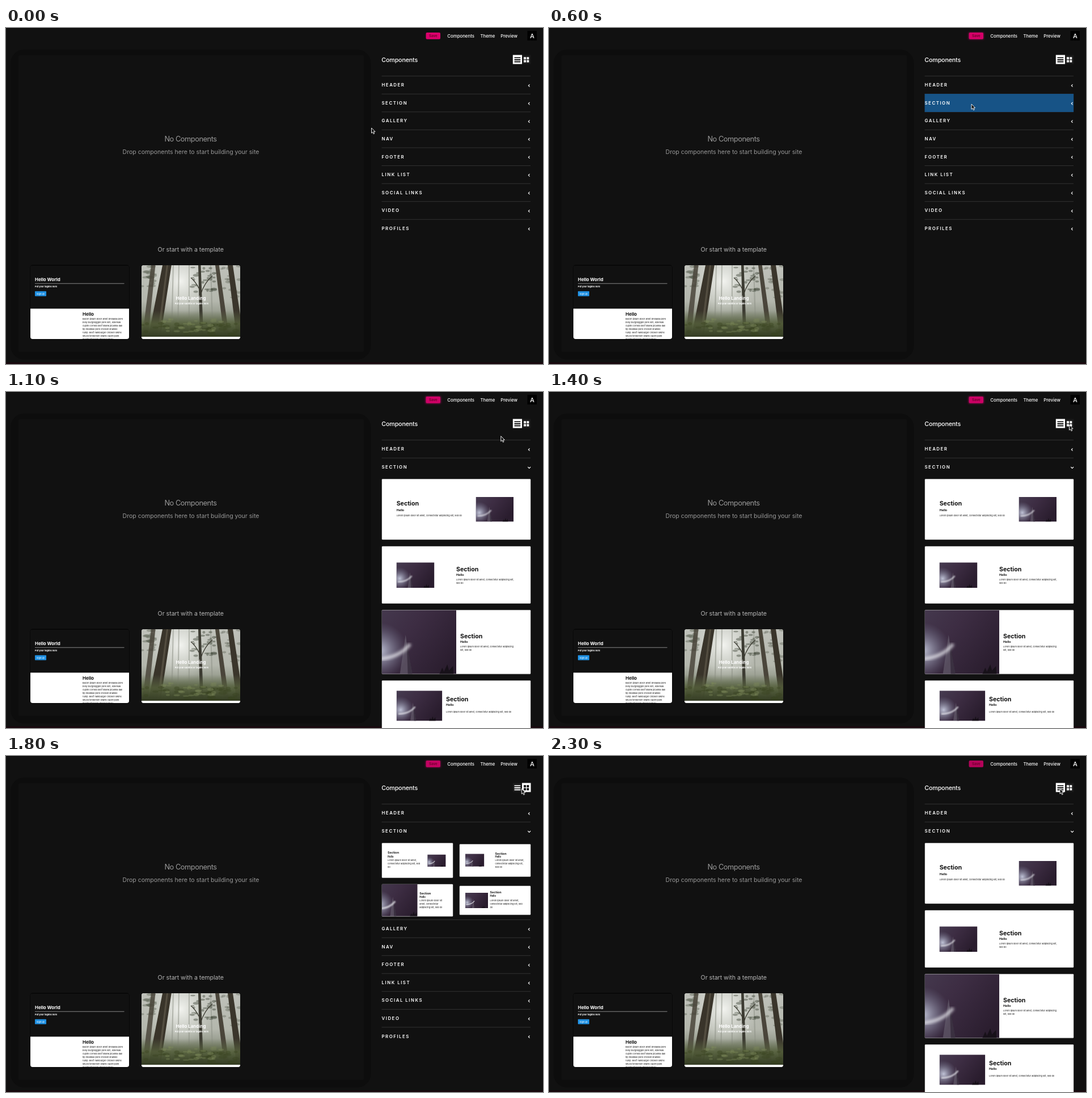
These frames come from a looping animation (947x592 px, 2400 ms). An HTML page:

```html
<!DOCTYPE html>
<html lang="en">
<head>
<meta charset="utf-8">
<title>Site builder</title>
<style>
  html, body { margin: 0; width: 100%; height: 100%; overflow: hidden; background: #111; }
  svg { display: block; width: 947px; height: 592px; }
  text { font-family: Inter, "Open Sans", sans-serif; fill: #fff; white-space: pre; }
  .mid { text-anchor: middle; }
  .nav { font-size: 7.8px; font-weight: 500; }
  .cat { font-size: 7.8px; font-weight: 600; letter-spacing: 1.55px; }
  .bold { font-weight: 700; }
  .tiny { font-size: 3.9px; }
  .ink text, text.ink { fill: #111; }
  .rule { stroke: #323232; }
  .chevron { fill: none; stroke: #fff; stroke-width: 1.1; }
  .card { fill: #fff; stroke: #d8d8d8; stroke-width: .5; }
  .hidden { display: none; }
  .tab rect { fill: #1b1b1b; }
  .tab path { fill: #fff; }
  .tab.on rect { fill: #fff; }
  .tab.on path { fill: #111; }
</style>
</head>
<body>
<svg viewBox="0 0 947 592">
  <defs>
    <linearGradient id="dusk" x2="1" y2=".5">
      <stop offset="0" stop-color="#463b50"/>
      <stop offset=".45" stop-color="#3d2d43"/>
      <stop offset="1" stop-color="#2a1d2e"/>
    </linearGradient>
    <radialGradient id="glow">
      <stop offset="0" stop-color="#ced3e6" stop-opacity=".9"/>
      <stop offset="1" stop-color="#7d809a" stop-opacity="0"/>
    </radialGradient>
    <linearGradient id="mist" x2="0" y2="1">
      <stop offset="0" stop-color="#bfc1ba"/>
      <stop offset=".5" stop-color="#b4b7ad"/>
      <stop offset=".75" stop-color="#8a9080"/>
      <stop offset="1" stop-color="#4a5238"/>
    </linearGradient>
    <radialGradient id="light">
      <stop offset="0" stop-color="#f2f3ef"/>
      <stop offset="1" stop-color="#d9dcd5" stop-opacity="0"/>
    </radialGradient>
    <linearGradient id="ground" x2="0" y2="1">
      <stop offset="0" stop-color="#5d6748" stop-opacity="0"/>
      <stop offset=".5" stop-color="#545f3a" stop-opacity=".85"/>
      <stop offset="1" stop-color="#343c24"/>
    </linearGradient>
    <filter id="soft"><feGaussianBlur stdDeviation="2.6"/></filter>
    <filter id="halo" x="-40%" y="-60%" width="180%" height="220%"><feGaussianBlur stdDeviation="1.8"/></filter>
    <clipPath id="dark-tile"><rect x="43" y="418" width="174" height="130" rx="4"/></clipPath>
    <clipPath id="photo-tile"><rect x="239" y="418" width="174" height="130" rx="4"/></clipPath>
    <symbol id="night" viewBox="0 0 172 113" preserveAspectRatio="xMidYMid slice">
      <rect width="172" height="113" fill="url(#dusk)"/>
      <ellipse cx="16" cy="72" rx="50" ry="50" fill="url(#glow)"/>
      <path d="M62 44 52 113H74Z" fill="#6c6473" opacity=".6"/>
      <path d="M64 52 66 113H74Z" fill="#302635" opacity=".7"/>
      <path d="M8 87Q50 86 70 60" fill="none" stroke="#f0f0f5" stroke-width="6" opacity=".75" filter="url(#soft)"/>
      <path d="M122 113l5-11 3 7 6-13 3 11 7-8 1 14z" fill="#171119"/>
    </symbol>
  </defs>

  <rect width="947" height="592" fill="#111"/>
  <path d="M0 .5H947M946.5 0V592" stroke="#080808"/>
  <path d="M0 590.5H947" stroke="#1c050d" stroke-width="2"/>
  <rect x="8" y="38" width="635.5" height="546" rx="24" fill="#0d0d0d"/>
  <rect x="22" y="48" width="609" height="522.5" rx="2" fill="#111"/>

  <rect id="halo-box" x="739" y="7" width="28.5" height="14" rx="3" fill="#90104f" filter="url(#halo)"/>
  <rect id="save" x="740.5" y="8" width="25.5" height="11.8" rx="2" fill="#dc006c"/>
  <text class="mid bold" x="753.3" y="16.2" font-size="6.2" style="fill:#70002f">Save</text>
  <text class="nav" x="778.3" y="16.8">Components</text>
  <text class="nav" x="836.5" y="16.8">Theme</text>
  <text class="nav" x="872.2" y="16.8">Preview</text>
  <rect x="919.5" y="5" width="16.5" height="17"/>
  <text class="mid" x="927.8" y="17.5" font-size="11" font-weight="500">A</text>

  <g class="mid">
    <text x="325.5" y="199.5" font-size="12.8" letter-spacing="-.45" style="fill:#9a9a9a">No Components</text>
    <text x="326" y="222.4" font-size="10.55" style="fill:#989898">Drop components here to start building your site</text>
    <text x="325.8" y="394.2" font-size="10.55" style="fill:#b8b8b8">Or start with a template</text>
  </g>

  <rect x="42.5" y="417.5" width="175" height="131" rx="4.5"/>
  <g clip-path="url(#dark-tile)">
    <rect x="43" y="418.5" width="174" height="77" fill="#111"/>
    <rect x="43" y="494.5" width="174" height="54" fill="#fff"/>
    <text class="bold" x="51" y="446" font-size="7.9">Hello World</text>
    <path d="M51 450.2H208.500" stroke="#a5a5a5" stroke-width=".8"/>
    <text class="bold tiny" x="51" y="456.6">Put your tagline here</text>
    <rect x="51" y="463.8" width="20" height="8.7" rx=".8" fill="#1f90e2"/>
    <text class="mid" x="61" y="469.5" font-size="3.7" font-weight="500">Sign Up</text>
    <text class="bold ink" x="135" y="507.3" font-size="8">Hello</text>
    <g id="story" class="ink"></g>
  </g>

  <g clip-path="url(#photo-tile)">
    <rect x="239" y="418" width="174" height="130" fill="#fff"/>
    <g id="forest"></g>
    <rect x="239" y="544" width="174" height="4" fill="#fff"/>
    <text class="mid bold" x="326" y="478.5" font-size="7.95">Hello Landing</text>
    <text class="mid tiny bold" x="327.5" y="486.6">Put your subtitle or tagline here</text>
  </g>

  <text x="662.3" y="59.6" font-size="10.7" font-weight="500" letter-spacing="-.15">Components</text>
  <g id="list-tab" class="tab">
    <rect x="893.8" y="47.5" width="16.2" height="16"/>
    <path d="M896.5 51.4h10.800v1.900h-10.800zm0 3.600h10.800v1.900h-10.800zm0 3.600h10.800v1.900h-10.800z"/>
  </g>
  <g id="grid-tab" class="tab">
    <rect x="910" y="47.5" width="15.5" height="16"/>
    <path d="M913 51.300h4v3.900h-4zm5.300 0h4v3.900h-4zM913 56.500h4v3.900h-4zm5.300 0h4v3.900h-4z"/>
  </g>

  <g id="top-rows"></g>
  <g id="rest-rows"></g>
  <g id="press">
    <rect x="662.5" y="116" width="262.7" height="32" fill="#175386"/>
    <text class="cat" x="662.5" y="134.9">SECTION</text>
  </g>
  <path id="closed-mark" class="chevron" d="M923.5 130.900l-2.200 2.200 2.200 2.200"/>
  <path id="open-mark" class="chevron" d="M920.3 132l2.400 2.400 2.400-2.400"/>
  <g id="list-cards" class="ink"></g>
  <g id="grid-cards" class="ink"></g>

  <circle id="ring" cx="901" cy="58" r="14.3" fill="#888" fill-opacity=".16" stroke="#c4c4c4" stroke-width="1.1"/>
  <path id="cursor" d="M0 0V9.200L2.100 7.300 3.600 10.700 5.200 10 3.800 6.700H6.600Z" fill="#111" stroke="#fff" stroke-width=".9" stroke-linejoin="round"/>
</svg>

<script>
const $ = id => document.getElementById(id);
const label = (x, y, text, cls, size) =>
  `<text x="${x}" y="${y}" class="${cls}"${size ? ` font-size="${size}"` : ''}>${text}</text>`;
const lines = (x, y, step, text) =>
  text.split('|').map((s, i) => label(x, y + i * step, s, 'tiny')).join('');

// Accordion rows
const names = ['HEADER', 'SECTION', 'GALLERY', 'NAV', 'FOOTER', 'LINK LIST', 'SOCIAL LINKS', 'VIDEO', 'PROFILES'];
const row = (name, i) => {
  const y = 84.7 + i * 31.57;
  const mark = name === 'SECTION' ? '' : `<path class="chevron" d="M923.5 ${y + 14.6}l-2.2 2.2 2.2 2.2"/>`;
  return `<path class="rule" d="M662.5 ${y}H925"/>${label(662.5, y + 18.6, name, 'cat')}${mark}`;
};
const rows = names.map(row);
$('top-rows').innerHTML = rows.slice(0, 2).join('');
$('rest-rows').innerHTML = rows.slice(2).join('');

// Section cards: box, photo, text column x, baselines of title, subtitle and body, body text
const card = ([box, photo, x, title, sub, body, text], titleSize, subSize) => {
  const rect = ([x, y, w, h]) => `x="${x}" y="${y}" width="${w}" height="${h}"`;
  return `<rect class="card" ${rect(box)} rx="1"/><use href="#night" ${rect(photo)}/>` +
    label(x, title, 'Section', 'bold', titleSize) + label(x, sub, 'Hello', 'bold', subSize) +
    lines(x, body, 6, text);
};
const wide = [
  [[663, 153.5, 262, 106.5], [828.5, 185, 66.5, 43.5], 688.7, 199.8, 210, 219.4, 'Lorem ipsum dolor sit amet, consectetur adipiscing elit, sed do'],
  [[663, 272, 262, 100.5], [688.7, 300.3, 66.5, 44.7], 794, 316, 323.8, 332, 'Lorem ipsum dolor sit amet, consectetur adipiscing elit,|sed do'],
  [[663, 384.3, 262, 112.5], [663, 384.3, 131, 112.5], 801, 433.8, 442, 450.3, 'Lorem ipsum dolor sit amet, consectetur adipiscing|elit, sed do'],
  [[663, 508.5, 262, 100], [688.7, 526.2, 80.5, 53.3], 776, 544.7, 552.6, 565.3, 'Lorem ipsum dolor sit amet, consectetur adipiscing elit, sed do']
];
const small = [
  [[663, 153.5, 125, 61], [743.3, 173.5, 32.2, 21.5], 673, 171.9, 178.6, 185.4, 'Lorem ipsum dolor sit amet,|consectetur adipiscing elit, sed|do'],
  [[800, 155.5, 125, 57], [810, 172.3, 33.2, 22.5], 862.5, 173.8, 179.3, 185.4, 'Lorem ipsum dolor sit amet,|consectetur adipiscing elit,|sed do'],
  [[663, 226, 125, 56.5], [663, 226, 62.5, 56.5], 729.3, 244, 249.5, 256, 'Lorem ipsum dolor sit|amet, consectetur|adipiscing elit, sed do'],
  [[800, 229, 125, 50.7], [810, 241, 40, 27], 853.5, 242, 247.6, 256, 'Lorem ipsum dolor sit amet,|consectetur adipiscing elit, sed|do']
];
$('list-cards').innerHTML = wide.map(c => card(c, 10.6, 5.4)).join('');
$('grid-cards').innerHTML = small.map(c => card(c, 5.4, 4.2)).join('');

$('story').innerHTML = lines(135, 514.4, 6, 'Bacon ipsum dolor amet bresaola pork|belly burgdoggen pork loin, leberkas|' +
  'cupim corned beef shank picanha ball|tip meatball pork chicken shankle|rump. Beef hamburger chicken swine|' +
  'shuck tenderloin shank cupim park|meatloaf bacon ribeye turkey');

// Misty forest: far trunks, near trunks, foliage and undergrowth
let seed = 7;
const rnd = () => (seed = seed * 16807 % 2147483647) / 2147483647;
const trunk = (top, foot, w, color, alpha = 1) =>
  `<path d="M${top} 418h${w * .75}L${foot + w} 540H${foot}Z" fill="${color}" opacity="${alpha}"/>`;
const blobs = (n, x, y, w, h, size, color, alpha) => Array.from({length: n}, () =>
  `<ellipse cx="${x + rnd() * w}" cy="${y + rnd() * h}" rx="${size * (.6 + rnd())}" ry="${size * (.3 + rnd() * .4)}" fill="${color}" opacity="${alpha}"/>`).join('');
$('forest').innerHTML =
  '<rect x="239" y="418" width="174" height="126" fill="url(#mist)"/>' +
  '<ellipse cx="308" cy="446" rx="60" ry="66" fill="url(#light)"/>' +
  [294, 304, 322, 360].map(x => trunk(x, x + (x - 326) * .1, 2.5, '#8e9287', .55)).join('') +
  blobs(20, 239, 418, 22, 40, 5, '#565c4e', .4) +
  blobs(30, 326, 422, 46, 44, 3.5, '#41473a', .45) +
  blobs(20, 378, 418, 34, 60, 4, '#555b4c', .35) +
  trunk(256, 241, 10, '#4b463b', .85) +
  trunk(276, 252, 21, '#39342a') +
  trunk(283, 267, 4, '#6f6757', .5) +
  trunk(339, 342, 6, '#3c3b32') +
  '<path d="M343 470Q350 448 364 437M342 462Q334 446 326 440" fill="none" stroke="#3c3b32" stroke-width="1.4"/>' +
  trunk(369, 384, 9, '#454035', .95) +
  trunk(391, 406, 12, '#3a352b') +
  '<rect x="239" y="498" width="174" height="46" fill="url(#ground)"/>' +
  blobs(36, 239, 520, 174, 24, 5, '#38421f', .4) +
  blobs(30, 275, 512, 105, 26, 4, '#7a8757', .4);

// Pointer legs: start ms, end ms, from, to
const legs = [
  [0, 500, [644.5, 176], [745, 134]],
  [700, 1300, [745, 134], [917.5, 58]],
  [1600, 2000, [917.5, 58], [901, 57.5]]
];
const ease = p => p * p * (3 - 2 * p);
const pointer = t => {
  const [a, b, from, to] = legs.filter(l => t >= l[0]).pop();
  const p = ease(Math.min(1, (t - a) / (b - a)));
  return from.map((v, i) => v + (to[i] - v) * p);
};
const show = (id, on) => $(id).classList.toggle('hidden', !on);

function draw(t) {
  const open = t >= 700;
  const grid = t >= 1500 && t < 2200;
  show('press', t === 600);
  show('closed-mark', !open);
  show('open-mark', open);
  show('rest-rows', !open || grid);
  $('rest-rows').setAttribute('transform', `translate(0 ${grid ? 140.7 : 0})`);
  show('list-cards', open && !grid);
  show('grid-cards', grid);
  $('list-tab').classList.toggle('on', !grid);
  $('grid-tab').classList.toggle('on', grid);
  show('ring', t === 2100);
  $('cursor').setAttribute('transform', `translate(${pointer(t)})`);
  $('halo-box').setAttribute('opacity', .6 * Math.sin(Math.PI * t / 2300));
  $('save').setAttribute('opacity', 1 - .2 * t / 2300);
}

const start = performance.now();
function tick() {
  draw(Math.floor((performance.now() - start) % 2400 / 100) * 100);
  requestAnimationFrame(tick);
}
tick();
</script>
</body>
</html>
```
